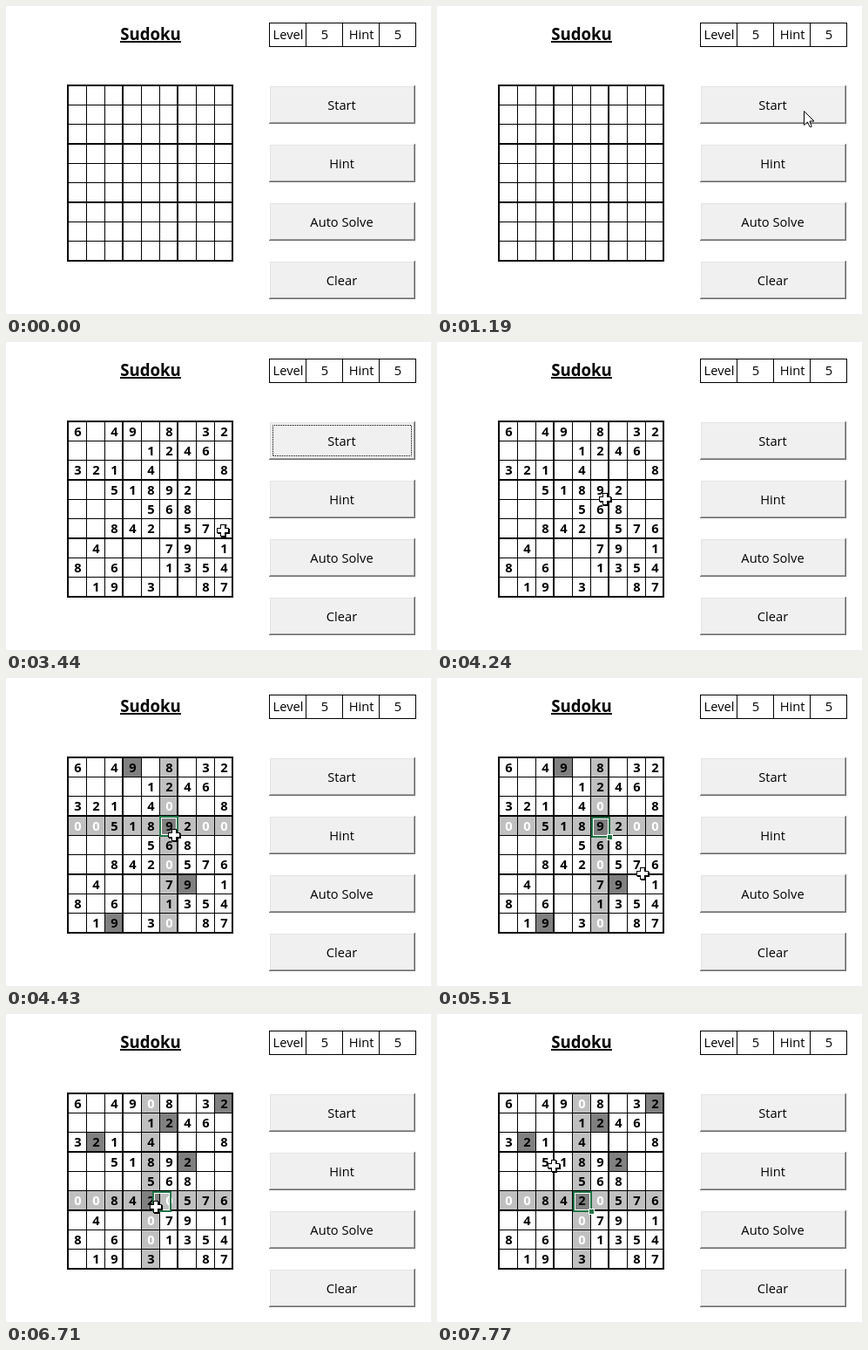
Write an HTML page with a canvas that moves like this. It is 488 px wide and 353 px high and loops after 8000 ms.

```html
<!DOCTYPE html>
<html lang="en">
<head>
<meta charset="utf-8">
<title>Sudoku</title>
<style>
  html, body { margin: 0; width: 100%; height: 100%; overflow: hidden; background: #fff; }
  canvas { display: block; }
</style>
</head>
<body>
<canvas id="stage" width="488" height="353"></canvas>
<script>
const ctx = document.getElementById('stage').getContext('2d');
const LOOP = 8000;
const STEP = 95;
const PRESS = 1690, FILL = 1780, CROSS = 3240, BLUR = 4240;
const FONT = '14.67px "Open Sans", "Noto Sans", sans-serif';
const TITLE_FONT = 'bold 18.67px "Open Sans", "Noto Sans", sans-serif';
const GREEN = '#217346';
const PUZZLE = ['6 49 8 32', '    1246 ', '321 4   8', '  51892  ', '    568  ',
                '  842 576', ' 4   79 1', '8 6  1354', ' 19 3  87'];
const BUTTONS = ['Start', 'Hint', 'Auto Solve', 'Clear'];

const MOVES = [
  { from: 500, to: 800, x: 415, y: 121 },
  { from: 1190, to: 1190, x: 421, y: 120 },
  { from: 2670, to: 2950, x: 382, y: 192 },
  { from: 3240, to: 3440, x: 249, y: 216 },
  { from: 3440, to: 4040, x: 193, y: 180 },
  { from: 4630, to: 5020, x: 234, y: 230 },
  { from: 5120, to: 5120, x: 236, y: 224 },
  { from: 5640, to: 6110, x: 172, y: 221 },
  { from: 7000, to: 7370, x: 134, y: 168 },
  { from: 7670, to: 7770, x: 134, y: 174 }
];
const PICKS = [{ at: 4330, row: 3, col: 5 }, { at: 5640, row: 5, col: 7 }, { at: 6620, row: 5, col: 4 }];

const ARROW = new Path2D('M0 0V16L4 12.5L6.5 18H8.5V17L6.5 11.5H11.5Z');

const lerp = (a, b, u) => a + (b - a) * u;
const easeInOut = u => u * u * (3 - 2 * u);
const easeOut = u => 1 - (1 - u) ** 4;
const lineX = col => 71 + 21 * col;
const lineY = row => 91 + Math.floor(row * 67 / 3);

function rect(color, x, y, w, h) {
  ctx.fillStyle = color;
  ctx.fillRect(x, y, w, h);
}

function box(color, x, y, w, h, line = 1) {
  ctx.strokeStyle = color;
  ctx.lineWidth = line;
  ctx.strokeRect(x + line / 2, y + line / 2, w - line, h - line);
}

function text(str, x, y, color = '#000', font = FONT) {
  ctx.font = font;
  ctx.fillStyle = color;
  ctx.fillText(str, x, y);
}

function drawHeader() {
  text('Sudoku', 166, 39, '#000', TITLE_FONT);
  const width = Math.round(ctx.measureText('Sudoku').width);
  rect('#000', Math.round(166 - width / 2), 40, width, 2);
  ['Level', '5', 'Hint', '5'].forEach((label, i) => {
    box('#000', 302 + 42 * i, 19, 43, 28);
    text(label, 324 + 42 * i, 38);
  });
}

function drawButton(label, y, pressed, focused) {
  const x = 302, w = 168, h = 44, shift = pressed ? 1 : 0;
  const edges = [['#fff', '#e3e3e3'], ['#696969', '#a0a0a0']];
  const [light, dark] = pressed ? edges.reverse() : edges;
  for (const i of [0, 1]) {
    rect(dark[i], x + i, y + i, w - 2 * i, h - 2 * i);
    rect(light[i], x + i, y + i, w - 2 * i - 1, h - 2 * i - 1);
  }
  rect('#f0f0f0', x + 2, y + 2, w - 4, h - 4);
  if (focused) {
    ctx.setLineDash([1, 1]);
    ctx.lineDashOffset = .5;
    box('#000', x + 4, y + 4, w - 8, h - 8);
    ctx.setLineDash([]);
  }
  text(label, 385.5 + shift, y + 28 + shift);
}

function drawCells(pick) {
  const chosen = pick && PUZZLE[pick.row][pick.col];
  PUZZLE.forEach((line, row) => [...line].forEach((digit, col) => {
    const x = lineX(col), y = lineY(row), empty = digit === ' ';
    const shaded = pick && (row === pick.row || col === pick.col);
    const matching = digit === chosen;
    if (shaded || matching) rect(matching ? '#808080' : '#c0c0c0', x, y, 21, 23);
    if (shaded || !empty)
      text(empty ? '0' : digit, x + 11.5, y + 17, empty ? '#fff' : '#000', 'bold ' + FONT);
  }));
}

function drawGrid() {
  for (let i = 0; i < 10; i++) {
    const extra = i % 3 ? 0 : 1;
    rect('#000', lineX(i) - extra, 90, 1 + extra, 203);
    rect('#000', 70, lineY(i) - extra, 191, 1 + extra);
  }
}

// The selection glides from the previous cell in three steps.
function drawSelection(pick, previous, t) {
  const progress = Math.min(1, Math.floor((t - pick.at) / STEP + 1) / 3);
  const u = easeOut(progress);
  const x = Math.round(lerp(lineX(previous.col), lineX(pick.col), u));
  const y = Math.round(lerp(lineY(previous.row), lineY(pick.row), u));
  box(GREEN, x + 1, y + 1, 22, 24, 2);
  box('#fff', x + 3, y + 3, 18, 20);
  if (progress === 1) {
    rect('#fff', x + 19, y + 21, 7, 7);
    rect(GREEN, x + 20, y + 22, 5, 5);
  }
}

function pointerAt(t) {
  let x = 444, y = 146;
  for (const move of MOVES) {
    if (t < move.from) break;
    const steps = Math.round((move.to - move.from) / STEP);
    const done = Math.min(1, (t - move.from) / (move.to - move.from || 1));
    const u = t >= move.to ? 1 : easeInOut(Math.floor(done * steps) / steps);
    x = lerp(x, move.x, u);
    y = lerp(y, move.y, u);
  }
  return [Math.round(x), Math.round(y)];
}

function plus(color, x, y, length, arm) {
  const side = (length - arm) / 2;
  rect(color, x + side, y, arm, length);
  rect(color, x, y + side, length, arm);
}

function drawPointer(t) {
  const [x, y] = pointerAt(t);
  if (t >= CROSS) {
    plus('#000', x - 6, y - 6, 14, 6);
    plus('#000', x - 7, y - 7, 14, 6);
    plus('#fff', x - 6, y - 6, 12, 4);
    return;
  }
  ctx.save();
  ctx.translate(x + .5, y + .5);
  ctx.fillStyle = '#fff';
  ctx.strokeStyle = '#000';
  ctx.lineWidth = 1;
  ctx.fill(ARROW);
  ctx.stroke(ARROW);
  ctx.restore();
}

function draw(t) {
  rect('#fff', 0, 0, 488, 353);
  ctx.textAlign = 'center';
  drawHeader();
  BUTTONS.forEach((label, i) => {
    const focused = i === 0 && t >= PRESS && t < BLUR;
    drawButton(label, 91 + 67 * i, focused && t < FILL, focused);
  });
  const index = PICKS.filter(pick => pick.at <= t).length - 1;
  const pick = PICKS[index];
  if (t >= FILL) drawCells(pick);
  drawGrid();
  if (pick) drawSelection(pick, PICKS[index - 1] || { row: 0, col: 0 }, t);
  if (t >= MOVES[0].from) drawPointer(t);
}

const began = performance.now();
function tick() {
  draw((performance.now() - began) % LOOP);
  requestAnimationFrame(tick);
}
tick();
</script>
</body>
</html>
```
